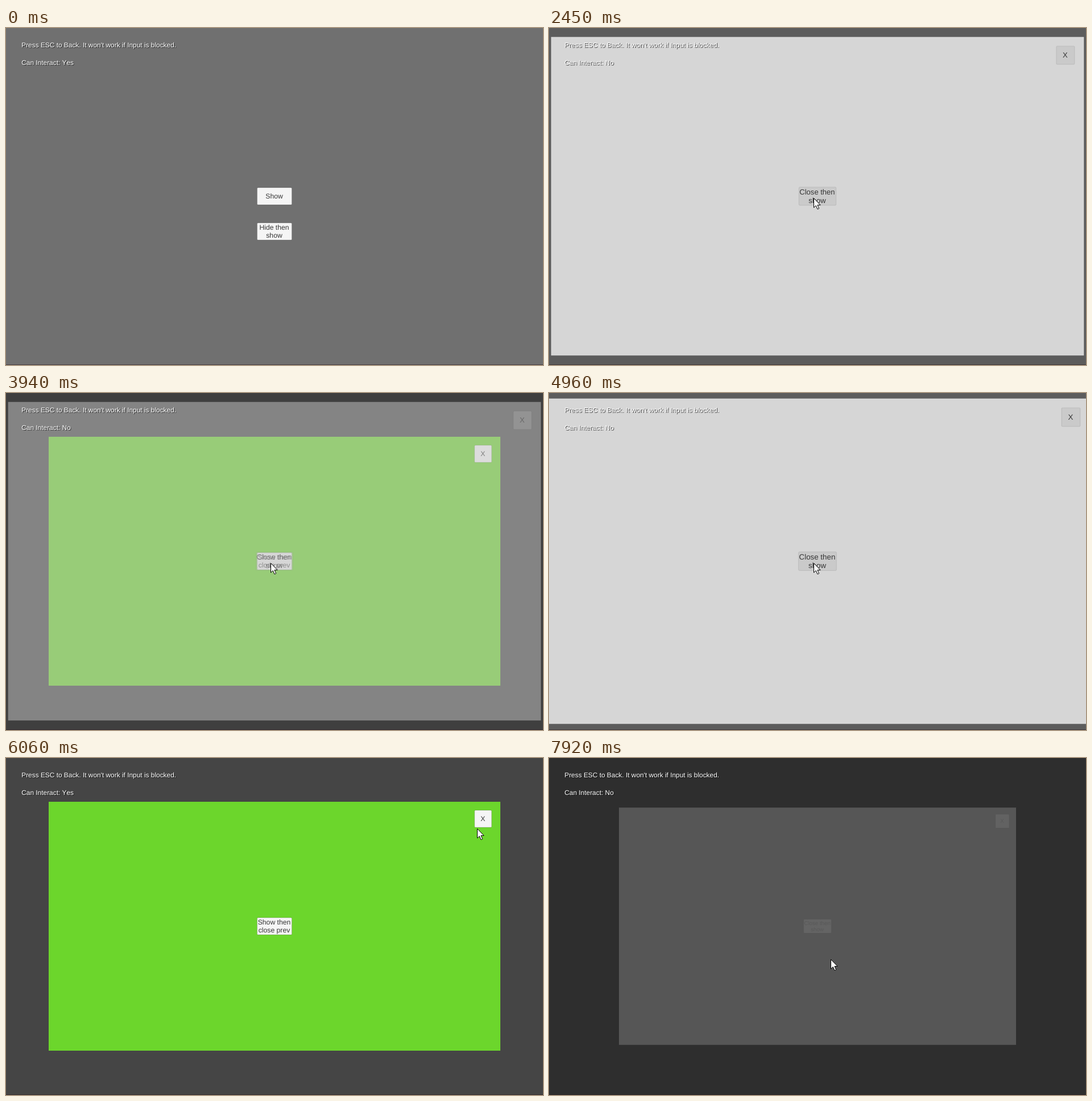
Animation of 944x593 px, one loop 8 s. Source, as an HTML page with a canvas:

```html
<!DOCTYPE html>
<html lang="en">
<head>
<meta charset="utf-8">
<title>Popup stack</title>
<style>
  html, body { margin: 0; width: 100%; height: 100%; overflow: hidden; background: #707070; }
  canvas { display: block; }
</style>
</head>
<body>
<canvas id="stage" width="944" height="593"></canvas>
<script>
const ctx = document.getElementById('stage').getContext('2d');
const W = 944, H = 593, CX = 472, CY = 296;
const LOOP = 8000, TWEEN = 350, FADE = 100, PRESS = 90;
const FONT = '"Liberation Sans", Arial, sans-serif';

// Popups are centred; a button's action lists what opens or closes, one after the other
const makeScreen = (w, h, color, dim) => ({ w, h, color, dim, buttons: [], shows: [] });
const main = makeScreen(W, H + 1, '#707070', 0);
const gray = makeScreen(876, 524, '#d6d6d6', 0.18);
const green = makeScreen(794, 438, '#6cd62c', 0.39);

const addButton = (screen, x, y, w, lines, ...action) =>
  screen.buttons.push({ x, y, w, h: 30, lines, action, pressedAt: [] });
const addClose = screen =>
  addButton(screen, CX + screen.w / 2 - 30.3, CY - screen.h / 2 + 30, 30, ['X'], [close, screen]);

addButton(main, CX, CY, 61, ['Show'], [open, gray]);
addButton(main, CX, CY + 62, 61, ['Hide then', 'show'], [close, main], [open, gray]);
addButton(gray, CX, CY, 61, ['Close then', 'show'], [close, gray], [open, green]);
addButton(green, CX, CY, 61, ['Show then', 'close prev'], [open, gray], [close, green]);
addClose(gray);
addClose(green);

// Play the clicks through once to build the timeline
const clicks = [[1299, main, 0], [2261, gray, 0], [3781, green, 0],
                [4792, gray, 0], [6560, green, 1], [7487, main, 1]];
const timeline = [], busy = [];

function open(screen, at) {
  const show = { screen, openAt: at, closeAt: Infinity };
  screen.current = show;
  timeline.push(show);
}
function close(screen, at) {
  screen.current.closeAt = at;
}

open(main, -1000);
for (const [at, screen, index] of clicks) {
  const button = screen.buttons[index];
  button.pressedAt.push(at);
  button.action.forEach(([act, target], i) => act(target, at + i * TWEEN));
  busy.push([at, at + button.action.length * TWEEN]);
}

const clamp = v => Math.max(0, Math.min(1, v));
const smooth = x => x * x * (3 - 2 * x);
const inBack = x => 2.70158 * x ** 3 - 1.70158 * x ** 2;
const outBack = x => 1 - inBack(1 - x);

function box(x, y, w, h, r, fill) {
  ctx.beginPath();
  ctx.roundRect(x, y, w, h, r);
  ctx.fillStyle = fill;
  ctx.fill();
}

function drawButton({ x, y, w, h, lines, pressedAt }, enabled, t) {
  const down = pressedAt.some(at => t >= at - PRESS && t < at);
  const shade = down ? 192 : 192 + 53 * enabled;
  const alpha = 0.5 + 0.5 * enabled;
  box(x - w / 2, y - h / 2, w, h, 1.5, `rgba(${shade},${shade},${shade},${alpha})`);
  ctx.strokeStyle = `rgba(60,60,60,${0.3 * alpha})`;
  ctx.lineWidth = 0.8;
  ctx.stroke();
  ctx.font = `12.2px ${FONT}`;
  ctx.textAlign = 'center';
  ctx.fillStyle = '#363636';
  lines.forEach((line, i) =>
    ctx.fillText(line, x - 0.5, y + 4 + 14 * (i - (lines.length - 1) / 2)));
}

function drawScreen({ screen, openAt, closeAt }, t) {
  if (t < openAt || t >= closeAt + TWEEN) return;
  const opened = clamp((t - openAt) / TWEEN);
  const closing = 1 - inBack(clamp((t - closeAt) / TWEEN));
  const scale = outBack(opened) * closing;
  const enabled = clamp((t - openAt - TWEEN) / FADE) * (1 - clamp((t - closeAt) / FADE));
  const { w, h, color, dim, buttons } = screen;

  ctx.save();
  ctx.globalAlpha = opened * clamp(closing);
  box(0, 0, W, H, 0, `rgba(0,0,0,${dim})`);
  ctx.translate(CX, CY);
  ctx.scale(scale, scale);
  ctx.translate(-CX, -CY);
  box(CX - w / 2, CY - h / 2, w, h, 0, color);
  buttons.forEach(b => drawButton(b, enabled, t));
  ctx.restore();
}

function drawLabel(text, y) {
  ctx.font = `11.9px ${FONT}`;
  ctx.textAlign = 'left';
  ctx.fillStyle = 'rgba(0,0,0,0.7)';
  ctx.fillText(text, 28.2, y + 1);
  ctx.fillStyle = '#fff';
  ctx.fillText(text, 27.2, y);
}

const arrow = new Path2D('M0 0V16.5L3.8 13L6.5 19.3L9.2 18.1L6.5 12H11.6Z');

function drawCursor(t) {
  if (t < 110) return;
  const progress = (from, to) => smooth(clamp((t - from) / (to - from)));
  const enter = progress(110, 890), toClose = progress(5500, 6060), toHide = progress(6600, 7230);
  // The entry swings out to the left before it settles
  const swing = 400 * enter ** 2 * (1 - enter);
  const x = 696 - 230.5 * enter - swing + 363 * toClose - 333 * toHide;
  const y = 539 - 239.5 * enter - swing * 0.6 - 175 * toClose + 230 * toHide;
  ctx.save();
  ctx.translate(x, y);
  ctx.fillStyle = '#fff';
  ctx.strokeStyle = '#000';
  ctx.lineWidth = 1;
  ctx.fill(arrow);
  ctx.stroke(arrow);
  ctx.restore();
}

function frame() {
  const t = performance.now() % LOOP;
  ctx.fontKerning = 'none';
  ctx.textRendering = 'geometricPrecision';
  ctx.fillStyle = '#303030';
  ctx.fillRect(0, 0, W, H);
  timeline.forEach(show => drawScreen(show, t));
  ctx.fillStyle = 'rgba(45,30,35,0.6)';
  ctx.fillRect(0, H - 1, W, 1);
  const blocked = busy.some(([from, to]) => t >= from && t < to);
  drawLabel("Press ESC to Back. It won't work if Input is blocked.", 34);
  drawLabel('Can Interact: ' + (blocked ? 'No' : 'Yes'), 65);
  drawCursor(t);
  requestAnimationFrame(frame);
}
frame();
</script>
</body>
</html>
```
